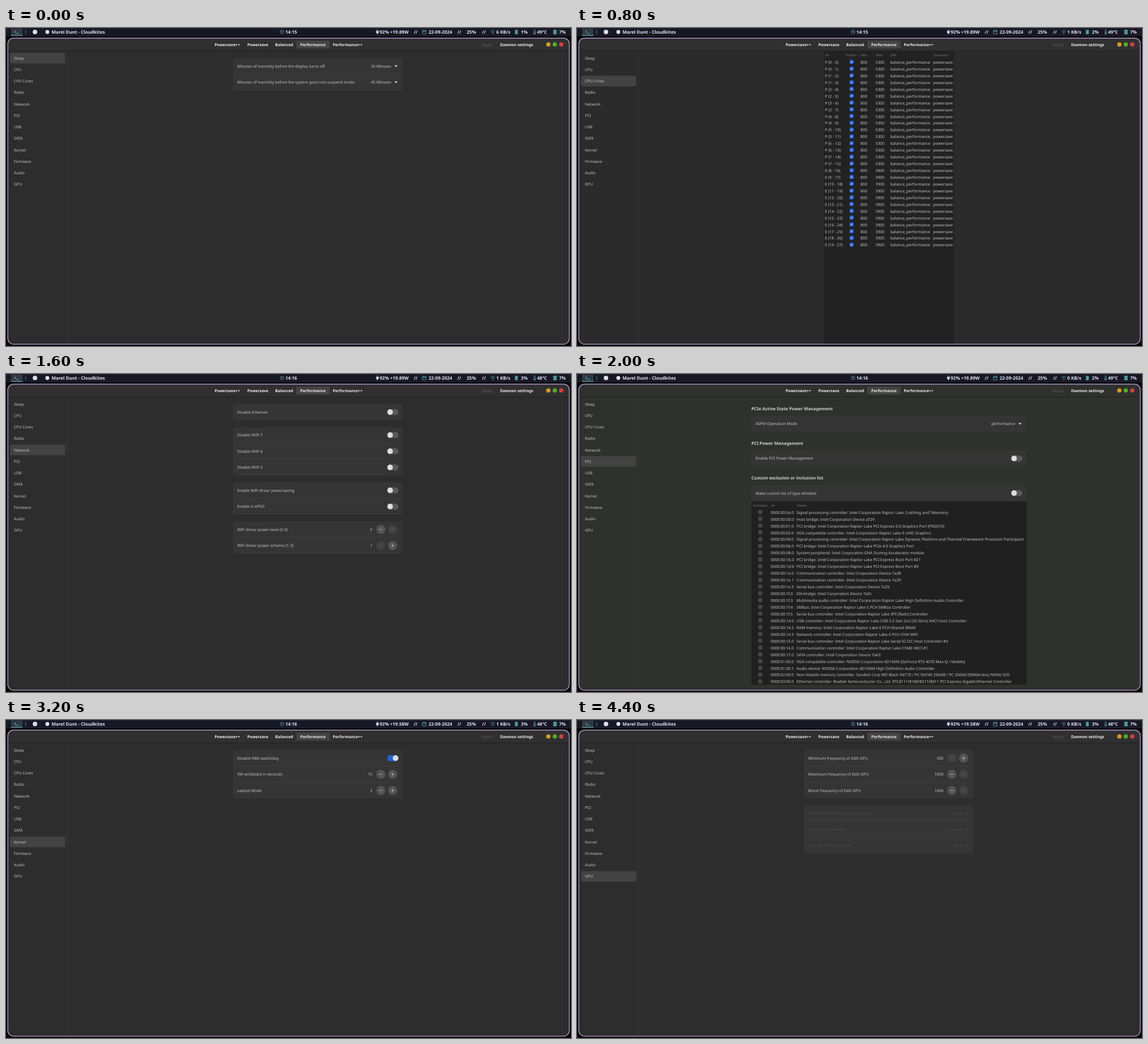
Recreate the animation shown at these times as an HTML page. Size 998 by 561 pixels, loop 4.8 s.

```html
<!DOCTYPE html>
<html lang="en">
<head>
<meta charset="utf-8">
<title>Power settings</title>
<style>
html, body { margin: 0; width: 100%; height: 100%; overflow: hidden; background: #08080c; }
svg { display: block; width: 998px; height: 561px; }
text { font: 6.9px "Noto Sans", "Open Sans", sans-serif; fill: #c6c6c6; white-space: pre; text-rendering: geometricPrecision; }
.b { font-weight: 700; fill: #efefef; }
.h { font-size: 7.65px; font-weight: 700; fill: #d0d0d0; }
.bar { font-size: 8px; font-weight: 700; fill: #dfe3f3; }
.teal { fill: #4c9fa9; }
.line { fill: none; stroke: #4c9fa9; stroke-width: .9; }
.col { font-size: 5.75px; font-weight: 700; fill: #5b5b5b; }
.dim { fill: #4b4b4b; }
</style>
</head>
<body>
<svg id="stage" viewBox="0 0 998 561" xmlns="http://www.w3.org/2000/svg"></svg>
<script>
const STEP = 400, ROW = 28.5, GAP = 12, LINE = 11.95;
const tabs = ['Sleep', 'CPU', 'CPU Cores', 'Radio', 'Network', 'PCI', 'USB', 'SATA', 'Kernel', 'Firmware', 'Audio', 'GPU'];

// y is the middle of the line of text
const text = (x, y, s, cls = '', anchor = 'start') =>
  `<text x="${x}" y="${y + 2.45}" class="${cls}" text-anchor="${anchor}">${s}</text>`;
const rect = (x, y, w, h, fill, r = 0, more = '') =>
  `<rect x="${x}" y="${y}" width="${w}" height="${h}" fill="${fill}" rx="${r}" ${more}/>`;
const dot = (x, y, r, fill) => `<circle cx="${x}" cy="${y}" r="${r}" fill="${fill}"/>`;
const path = (d, stroke, w) => `<path d="${d}" fill="none" stroke="${stroke}" stroke-width="${w}"/>`;

// Row controls: r is the right edge of the card
const pick = (value, off) => (r, y) =>
  text(r - 20, y, value, off ? 'dim' : '', 'end') +
  `<path d="M${r - 14.6} ${y - 1.4}h5.8l-2.9 3.1z" fill="${off ? '#4b4b4b' : '#d8d8d8'}"/>`;

const toggle = on => (r, y) =>
  rect(r - 27.2, y - 5.2, 20, 10.4, on ? '#2362dc' : '#595959', 5.2) +
  dot(on ? r - 12.4 : r - 22, y, 4.9, '#dedede');

const round = (x, y, plus, on) => {
  const d = `M${x - 2.8} ${y}h5.6` + (plus ? `M${x} ${y - 2.8}v5.6` : '');
  return dot(x, y, 8, on ? '#545454' : '#424242') + path(d, on ? '#d2d2d2' : '#595959', .8);
};
const spin = (value, down = 1, up = 1) => (r, y) =>
  text(r - 53.3, y, value, '', 'end') + round(r - 38.4, y, 0, down) + round(r - 17.6, y, 1, up);

// Stacks headings and cards from the top; a string is a heading
function stack(parts, l = 401, r = 700.5) {
  let y = 53, out = '';
  for (const part of parts) {
    if (typeof part === 'string') {
      out += text(l, y + 8.7, part, 'h');
      y += 20.6;
      continue;
    }
    out += rect(l, y, r - l, part.length * ROW, '#353535', 4);
    part.forEach(([label, control, off], i) => {
      const mid = y + (i + .5) * ROW;
      if (i) out += rect(l + 7, mid - ROW / 2 - .3, r - l - 14, .6, '#434343');
      out += text(l + 7.4, mid, label, off ? 'dim' : '') + control(r, mid);
    });
    y += part.length * ROW + GAP;
  }
  return out;
}

const box = (x, y, on) => on
  ? rect(x - 3.5, y - 3.5, 7, 7, '#2463de', 1.3) + path(`M${x - 1.9} ${y}l1.4 1.5 2.6-2.9`, '#fff', 1)
  : rect(x - 3.2, y - 3.2, 6.4, 6.4, '#454545', 1.2, 'stroke="#545454" stroke-width=".6"');

// Device list: one "id name" entry per line
function devices(l, r, top, bottom, idX, nameX, fill, list) {
  let out = rect(l, top, r - l, bottom - top, fill);
  const y = top + 6.4;
  out += text(l + 2.8, y, 'Included', 'col') + text(idX + 1, y, 'Id', 'col') + text(nameX + 1, y, 'Name', 'col');
  out += rect(idX - 2.6, top + 2, .6, 9, '#333') + rect(nameX - 2.4, top + 2, .6, 9, '#333');
  list.trim().split('\n').forEach((s, i) => {
    const cut = s.indexOf(' '), mid = top + 19.5 + i * LINE;
    out += box(l + 15.8, mid - .6) + text(idX, mid, s.slice(0, cut)) + text(nameX, mid, s.slice(cut + 1));
  });
  return out;
}

function cores() {
  let out = rect(436, 41, 230, 516, '#222');
  [[439, 'Id'], [475, 'Online'], [501.5, 'Min'], [528, 'Max'], [554, 'EPP'], [630, 'Governor']]
    .forEach(([x, s]) => out += text(x, 47.5, s, 'col'));
  [472, 498, 524.5, 551, 626.5].forEach(x => out += rect(x, 43, .6, 9, '#313131'));
  for (let n = 0; n < 28; n++) {
    const y = 60.5 + n * 11.944, big = n < 16;
    out += text(438, y, big ? `P (${n >> 1} - ${n})` : `E (${n - 8} - ${n})`) + box(485, y - .7, 1) +
      text(500.8, y, '800') + text(527.2, y, big ? '5300' : '3900') +
      text(553.6, y, 'balance_performance') + text(629, y, 'powersave');
  }
  return out;
}

const pciList = `
0000:00:0a.0 Signal processing controller: Intel Corporation Raptor Lake Crashlog and Telemetry
0000:00:00.0 Host bridge: Intel Corporation Device a729
0000:00:01.0 PCI bridge: Intel Corporation Raptor Lake PCI Express 5.0 Graphics Port (PEG010)
0000:00:02.0 VGA compatible controller: Intel Corporation Raptor Lake-S UHD Graphics
0000:00:04.0 Signal processing controller: Intel Corporation Raptor Lake Dynamic Platform and Thermal Framework Processor Participant
0000:00:06.0 PCI bridge: Intel Corporation Raptor Lake PCIe 4.0 Graphics Port
0000:00:08.0 System peripheral: Intel Corporation GNA Scoring Accelerator module
0000:00:1b.0 PCI bridge: Intel Corporation Raptor Lake PCI Express Root Port #21
0000:00:1d.0 PCI bridge: Intel Corporation Raptor Lake PCI Express Root Port #9
0000:00:1e.0 Communication controller: Intel Corporation Device 7a28
0000:00:1e.1 Communication controller: Intel Corporation Device 7a29
0000:00:1e.3 Serial bus controller: Intel Corporation Device 7a2b
0000:00:1f.0 ISA bridge: Intel Corporation Device 7a0c
0000:00:1f.3 Multimedia audio controller: Intel Corporation Raptor Lake High Definition Audio Controller
0000:00:1f.4 SMBus: Intel Corporation Raptor Lake-S PCH SMBus Controller
0000:00:1f.5 Serial bus controller: Intel Corporation Raptor Lake SPI (flash) Controller
0000:00:14.0 USB controller: Intel Corporation Raptor Lake USB 3.2 Gen 2x2 (20 Gb/s) XHCI Host Controller
0000:00:14.2 RAM memory: Intel Corporation Raptor Lake-S PCH Shared SRAM
0000:00:14.3 Network controller: Intel Corporation Raptor Lake-S PCH CNVi WiFi
0000:00:15.0 Serial bus controller: Intel Corporation Raptor Lake Serial IO I2C Host Controller #0
0000:00:16.0 Communication controller: Intel Corporation Raptor Lake CSME HECI #1
0000:00:17.0 SATA controller: Intel Corporation Device 7a63
0000:01:00.0 VGA compatible controller: NVIDIA Corporation AD106M [GeForce RTX 4070 Max-Q / Mobile]
0000:01:00.1 Audio device: NVIDIA Corporation AD106M High Definition Audio Controller
0000:02:00.0 Non-Volatile memory controller: Sandisk Corp WD Black SN770 / PC SN740 256GB / PC SN560 (DRAM-less) NVMe SSD
0000:03:00.0 Ethernet controller: Realtek Semiconductor Co., Ltd. RTL8111/8168/8211/8411 PCI Express Gigabit Ethernet Controller`;

const usbList = `
1d6b:0002 Linux Foundation 2.0 root hub
3434:d030 Keychron  Keychron Link
046d:c539 Logitech, Inc. Lightspeed Receiver
046d:0aba Logitech, Inc. PRO X Wireless Gaming Headset
0408:548d Quanta Computer, Inc. HP True Vision FHD Camera
8087:0033 Intel Corp. AX211 Bluetooth
1d6b:0003 Linux Foundation 3.0 root hub`;

const custom = ['Custom exclusion or inclusion list', [['Make custom list of type whitelist', toggle()]]];

const pages = [
  stack([[['Minutes of inactivity before the display turns off.', pick('30 Minutes')],
    ['Minutes of inactivity before the system goes into suspend mode.', pick('45 Minutes')]]]),
  stack([
    [['Scaling driver operation mode', pick('active')],
      ['Energy performance preference', pick('balance_performance')], ['Scaling governor', pick('powersave')]],
    [['Minimum frequency (MHz)', spin('800', 0)], ['Maximum frequency (MHz)', spin('5300', 1, 0)]],
    [['Minimum performance percentage', spin('0', 0)], ['Maximum performance percentage', spin('100', 1, 0)]],
    [['Boost technology', toggle(1)], ['HWP dynamic boost', toggle(1)]]]),
  cores(),
  stack([[['Block WiFi', toggle()], ['Block NFC', toggle()], ['Block Bluetooth', toggle()]]]),
  stack([
    [['Disable Ethernet', toggle()]],
    [7, 6, 5].map(n => ['Disable WiFi ' + n, toggle()]),
    [['Enable WiFi driver powersaving', toggle()], ['Enable U-APSD', toggle()]],
    [['WiFi driver power level (0-5)', spin('5', 1, 0)], ['WiFi driver power scheme (1-3)', spin('1', 0, 1)]]]),
  stack(['PCIe Active State Power Management', [['ASPM Operation Mode', pick('performance')]],
    'PCI Power Management', [['Enable PCI Power Management', toggle()]], ...custom], 308, 794) +
    devices(308, 794, 224.7, 548, 342, 387.8, '#202020', pciList),
  stack(['USB Power Management', [['Enable USB Power Management', toggle()],
    ['USB Autosupsend delay in miliseconds', spin('10000')]], ...custom]) +
    devices(401, 700.5, 192, 289, 435, 473.5, '#212224', usbList),
  stack([[['SATA Active Link Power Management', pick('max_performance')]]]),
  stack([[['Disable NMI watchdog', toggle(1)], ['VM writeback in seconds', spin('15')], ['Laptop Mode', spin('2')]]]),
  stack([[['ACPI Platform Profile', pick('performance')]]]),
  stack([[['Audio module idle timeout in seconds', spin('0', 0)]]]),
  stack([
    [['Minimum frequency of Zelti GPU', spin('300', 0)], ['Maximum frequency of Zelti GPU', spin('1600', 1, 0)],
      ['Boost frequency of Zelti GPU', spin('1600', 1, 0)]],
    [['VOQ GPU DPM Performance Level', pick('auto', 1), 1], ['VOQ GPU DPM State', pick('balanced', 1), 1],
      ['VOQ GPU Power Profile', pick('auto', 1), 1]]])
];

// Status bar readings per page: KB/s, load, temperature
const net = [6, 0, 1, 1, 1, 0, 1, 1, 1, 0, 1, 0];
const load = [1, 3, 2, 3, 3, 2, 3, 2, 3, 2, 2, 3];
const temp = [49, 48, 49, 48, 48, 49, 49, 48, 48, 49, 48, 48];

const stroke = d => `<path class="line" d="${d}"/>`;
const live = (id, x) => `<text id="${id}" class="bar" x="${x}" y="9.6"></text>`;
const label = (x, s) => text(x, 7.15, s, 'bar');

const bar =
  rect(0, .6, 998, 12.8, '#181825', 0, 'stroke="#2a2b3d" stroke-width=".8"') +
  rect(9, 1, 20, 12, '#2d3a44') + rect(9, 12.4, 20, 1.2, '#5cb3b4') +
  path('M15 4.8l2.3 2-2.3 2M18.4 9.3h3.6', '#a9cdd2', .9) +
  rect(34.4, 3.5, .9, 7, '#4c9fa9') +
  dot(51.2, 7, 4, '#d9dcea') + dot(73, 7, 3.4, '#dfe3f3') + label(80.5, 'Marel Dunt - Cloudkites') +
  stroke('M490.8 7a3.1 3.1 0 1 1-6.2 0a3.1 3.1 0 1 1 6.2 0M487.7 5v2.1h-1.5') + live('clock', 493.5) +
  '<path d="M653.6 5.4h5v1.8q0 1.7-1.8 2.1v1.7h-1.4v-1.7q-1.8-.4-1.8-2.1zM654.4 3.2h1v2h-1zM656.8 3.2h1v2h-1z" fill="#dfe3f3"/>' +
  live('power', 660) + label(720.3, '//') +
  stroke('M735.6 4.6h6.4v5.8h-6.4zM735.6 6.2h6.4M737.2 3v2M740.4 3v2') + label(746.4, '22-09-2024') +
  label(797.2, '//') + label(813.8, '25%') + label(841, '//') +
  stroke('M855.6 6q4.2-3.6 8.4 0M857.2 7.8q2.6-2.2 5.2 0') + dot(859.8, 9.6, 1, '#4c9fa9') + live('net', 866) +
  rect(899.3, 3.2, 4.4, 7.8, '#4c9fa9', .6) + path('M898.2 4.6h6.6M898.2 7.1h6.6M898.2 9.6h6.6', '#4c9fa9', .7) +
  live('load', 909.6) +
  stroke('M932.7 8V4.2a1.1 1.1 0 0 1 2.2 0V8a1.7 1.7 0 1 1-2.2 0z') + dot(933.8, 9.4, 1.1, '#4c9fa9') + live('temp', 938) +
  [4.2, 7.1, 10].map(y => `<ellipse class="teal" cx="969.7" cy="${y}" rx="3.3" ry="1.2"/>`).join('') +
  rect(966.4, 5.2, 6.6, .8, '#4c9fa9') + rect(966.4, 8.1, 6.6, .8, '#4c9fa9') + label(977, '7%');

const frame =
  rect(3.2, 17.8, 991.8, 540, '#2d2d2d', 10, 'id="pane"') +
  `<path d="M3.2 40.5V27.8a10 10 0 0 1 10-10H985a10 10 0 0 1 10 10V40.5z" fill="#303030" id="head"/>` +
  rect(3.2, 40.1, 991.8, .9, '#1f1f1f') + rect(107.6, 41, .8, 516.5, '#3a3a3a') +
  rect(513, 22.6, 58.6, 13.4, '#444') +
  [[391, 'Powersave++'], [444.8, 'Powersave'], [491.4, 'Balanced'], [542.2, 'Performance'], [603.4, 'Performance++'],
    [902, 'Daemon settings']].map(([x, s]) => text(x, 29.2, s, 'b', 'middle')).join('') +
  text(850, 29.2, 'Apply', 'b" style="fill:#4d4d4d', 'middle') +
  dot(958, 29.1, 3.8, '#db9a1b') + dot(969.4, 29.1, 3.8, '#4bae2d') + dot(980.8, 29.1, 3.8, '#d83f40');

const rowY = i => 53.1 + i * 20.26;
document.getElementById('stage').innerHTML =
  rect(0, 0, 998, 561, '#08080c') + bar + frame +
  rect(7, rowY(0) - 9.4, 97.5, 18.8, '#434343', 3, 'id="mark"') +
  tabs.map((s, i) => text(14, rowY(i), s)).join('') +
  pages.map(p => `<g class="page">${p}</g>`).join('') +
  rect(3.2, 17.8, 991.8, 540, 'none', 10, 'stroke="#c5a9e4" stroke-width="1.2"');

const el = id => document.getElementById(id);
const groups = [...document.querySelectorAll('.page')];
let shown = -1;

function show(i) {
  groups.forEach((g, k) => g.style.display = k === i ? '' : 'none');
  el('mark').setAttribute('y', rowY(i) - 9.4);
  el('pane').setAttribute('fill', i === 5 ? '#2f312c' : i === 2 ? '#2b2b2b' : '#2d2d2d');
  el('head').setAttribute('fill', i === 5 ? '#2f312d' : '#303030');
  el('clock').textContent = i < 3 ? '14:15' : '14:16';
  el('power').textContent = `92% +19.${i < 6 ? 89 : 58}W`;
  el('net').textContent = net[i] + ' KB/s';
  el('load').textContent = load[i] + '%';
  el('temp').textContent = temp[i] + '°C';
}

function tick() {
  const i = Math.floor(performance.now() / STEP) % pages.length;
  if (i !== shown) show(shown = i);
  requestAnimationFrame(tick);
}
tick();
</script>
</body>
</html>
```
